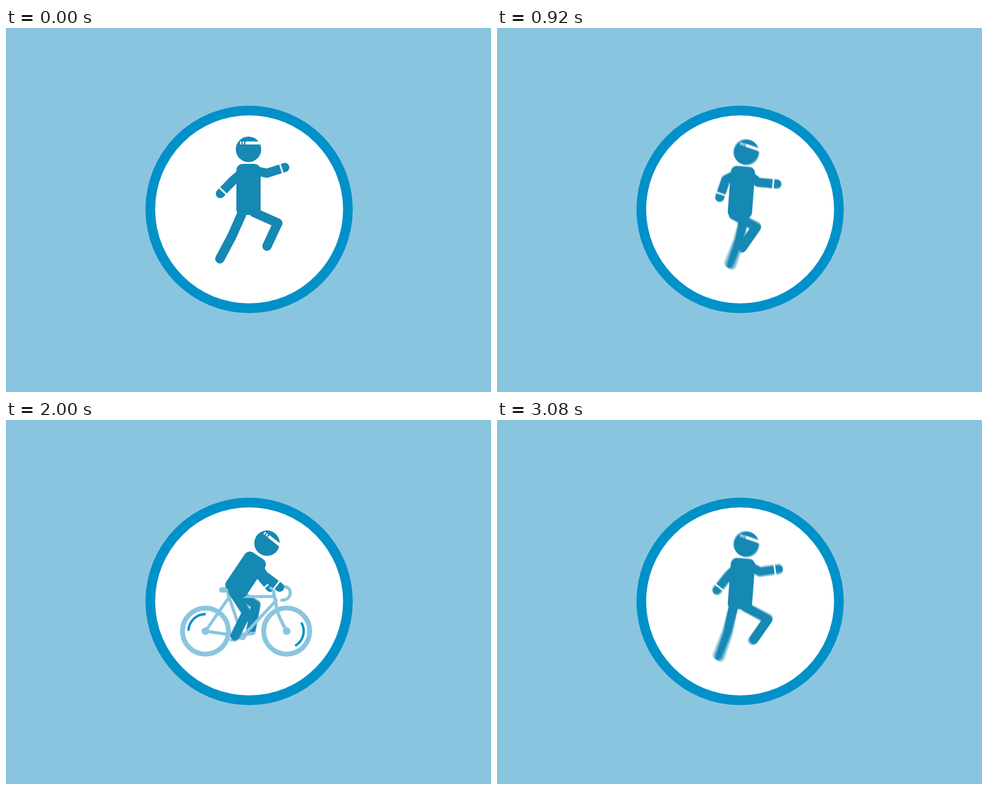
An HTML page with a canvas for the animation above (3120 ms loop, 800x600 px).

```html
<!DOCTYPE html>
<html lang="en">
<head>
<meta charset="utf-8">
<title>Run and ride</title>
<style>
  html, body { margin: 0; width: 100%; height: 100%; overflow: hidden; background: #8ac5e0; }
  canvas { display: block; }
</style>
</head>
<body>
<canvas id="stage" width="800" height="600"></canvas>
<script>
const LOOP = 3120, TICK = 40, SHUTTER = 20, SAMPLES = 10;
const STRIDE = 640, PEDAL = 480;
const SKY = '#8ac5e0', RING = '#0091c9', BODY = '#1688b4', WHITE = '#fff';
const TAU = Math.PI * 2, RAD = Math.PI / 180;

const stage = document.getElementById('stage').getContext('2d');
const buffer = document.createElement('canvas');
buffer.width = 800;
buffer.height = 600;
const g = buffer.getContext('2d');

const clamp = x => Math.min(1, Math.max(0, x));
const smooth = x => (1 - Math.cos(Math.PI * clamp(x))) / 2;
const mod = (x, n) => ((x % n) + n) % n;
const mix = (a, b, k) => Array.isArray(a) ? a.map((v, i) => mix(v, b[i], k)) : a + (b - a) * k;

// Point at a distance from p; 0 degrees is down, positive turns to the right.
const reach = (p, deg, len) => [p[0] + len * Math.sin(deg * RAD), p[1] + len * Math.cos(deg * RAD)];

// Periodic curve through [phase, value] keys, without overshoot.
function cycle(keys) {
  const n = keys.length;
  const key = i => [keys[mod(i, n)][0] + Math.floor(i / n), keys[mod(i, n)][1]];
  const slope = i => (key(i + 1)[1] - key(i)[1]) / (key(i + 1)[0] - key(i)[0]);
  const tangent = i => {
    const a = slope(i - 1), b = slope(i);
    return a * b > 0 ? 2 * a * b / (a + b) : 0;
  };
  return phase => {
    const v = mod(phase, 1);
    let i = n - 1;
    while (key(i)[0] > v) i--;
    const [x, y] = key(i), [x2, y2] = key(i + 1), w = x2 - x, k = (v - x) / w;
    return y * (1 + 2 * k) * (1 - k) ** 2 + y2 * k * k * (3 - 2 * k)
      + w * (tangent(i) * k * (1 - k) ** 2 - tangent(i + 1) * k * k * (1 - k));
  };
}

const thigh = cycle([[0, -24], [.0625, -12], [.12, -6], [.27, 30], [.4375, 62], [.5, 66], [.5625, 66], [.72, 26], [.82, 5], [.9375, -13]]);
const shin = cycle([[0, -28], [.0625, -45], [.13, -68], [.27, -62], [.4375, -35], [.5, -25], [.5625, -10], [.7, 12], [.82, -3], [.9375, -20]]);
const frontUpper = cycle([[0, 78], [.4375, 51], [.5625, 53], [.9375, 62]]);
const frontLower = cycle([[0, 108], [.4375, 85], [.5625, 90], [.9375, 98]]);
const backUpper = cycle([[0, -50], [.4375, -63], [.5625, -67], [.9375, -46]]);
const backLower = cycle([[0, -44], [.4375, -19], [.5625, -16], [.9375, -38]]);
const leanCurve = cycle([[0, 0], [.125, .3], [.65, 5.2], [.875, 4.5]]);
const nodCurve = cycle([[0, 0], [.125, 3], [.65, 16], [.875, 15]]);

function limb(start, a, lenA, b, lenB) {
  const joint = reach(start, a, lenA);
  return [start, joint, reach(joint, b, lenB)];
}

function runner(t) {
  const v = t / STRIDE, step = 2 * v;
  const bob = 15 * Math.abs(Math.sin(Math.PI * step)) ** 1.4;
  const lean = leanCurve(step), nod = nodCurve(step);
  const hip = [400, 308 + bob];
  const neck = reach(hip, 180 - lean, 84);
  const chest = reach(neck, -lean, 10);
  const leg = (x, phase) => limb([x, 304 + bob], thigh(phase), 43, shin(phase), 42);
  return {
    hip, neck, tilt: lean + nod,
    head: reach(neck, 180 - lean - nod / 2, 24),
    farArm: limb([chest[0] - 5, chest[1]], backUpper(v), 26, backLower(v), 31),
    nearArm: limb([chest[0] + 5, chest[1]], frontUpper(v), 26, frontLower(v), 31),
    farLeg: leg(409, v + .5),
    nearLeg: leg(390, v)
  };
}

const crankAngle = t => (40 + 360 * (t - 1600) / PEDAL) * RAD;

function pedalLeg(hip, angle) {
  const foot = [391 + 14 * Math.cos(angle), 351 + 14 * Math.sin(angle)];
  const dx = foot[0] - hip[0], dy = foot[1] - hip[1], d = Math.hypot(dx, dy);
  const bend = Math.sqrt(Math.max(0, 42.5 ** 2 - d * d / 4)) / d;
  return [hip, [hip[0] + dx / 2 + dy * bend, hip[1] + dy / 2 - dx * bend], foot];
}

function rider(t) {
  const c = crankAngle(t), sway = Math.sin(c);
  return {
    hip: [375, 285], neck: [416, 224], tilt: 38, head: [430.5, 203],
    farArm: [[407, 237], [417, 253], [436, 276]],
    nearArm: [[414, 236], [424, 255], [451 - sway, 276 + sway]],
    farLeg: pedalLeg([376, 282], c),
    nearLeg: pedalLeg([374, 282], c + Math.PI)
  };
}

function poseAt(t) {
  const ride = smooth((t - 1180) / 200) * (1 - smooth((t - 2760) / 140));
  const a = runner(t < 2000 ? t : t - LOOP), b = rider(t), pose = {};
  for (const part in a) pose[part] = mix(a[part], b[part], ride);
  return pose;
}

const spinAt = t => TAU * (smooth((t - 1140) / 420) + smooth((t - 2383) / 560));

function disc(x, y, r, color) {
  g.fillStyle = color;
  g.beginPath();
  g.arc(x, y, r, 0, TAU);
  g.fill();
}

function line(points, width, color, cap = 'round') {
  g.strokeStyle = color;
  g.lineWidth = width;
  g.lineCap = cap;
  g.lineJoin = 'round';
  g.beginPath();
  points.forEach(p => g.lineTo(p[0], p[1]));
  g.stroke();
}

function strokePath(d, width) {
  g.strokeStyle = SKY;
  g.lineWidth = width;
  g.lineCap = 'round';
  g.stroke(new Path2D(d));
}

function turned(x, y, angle, draw) {
  g.save();
  g.translate(x, y);
  g.rotate(angle);
  draw();
  g.restore();
}

function drawArm(points) {
  line(points, 15, BODY);
  const [, elbow, hand] = points;
  const angle = Math.atan2(hand[1] - elbow[1], hand[0] - elbow[0]);
  turned(hand[0], hand[1], angle, () => {
    g.fillStyle = WHITE;
    g.fillRect(-7.5, -9, 2.8, 18);
  });
}

function drawTorso({ hip, neck }) {
  const dx = neck[0] - hip[0], dy = neck[1] - hip[1];
  turned(neck[0], neck[1], Math.atan2(dx, -dy), () => {
    g.fillStyle = BODY;
    g.beginPath();
    g.roundRect(-20, 0, 40, Math.hypot(dx, dy), [10, 10, 8, 8]);
    g.fill();
  });
}

function drawHead({ head, tilt }) {
  turned(head[0], head[1], tilt * RAD, () => {
    disc(0, 0, 21, BODY);
    g.fillStyle = WHITE;
    g.fillRect(-14, -13, 2.2, 5);
    g.fillRect(-9.6, -13, 2.2, 5);
    g.fillRect(-5, -13, 27, 5);
  });
}

function drawWheel(x, y, arcMiddle) {
  g.lineCap = 'butt';
  g.lineWidth = 8;
  g.strokeStyle = SKY;
  g.beginPath();
  g.arc(x, y, 38, 0, TAU);
  g.stroke();
  g.lineWidth = 4;
  g.strokeStyle = RING;
  g.beginPath();
  g.arc(x, y, 28, arcMiddle - Math.PI / 4, arcMiddle + Math.PI / 4);
  g.stroke();
  disc(x, y, 6.3, SKY);
}

function drawBike(t) {
  const roll = TAU * (t - 1600) / PEDAL;
  drawWheel(329, 348, roll - 74 * RAD);
  drawWheel(463, 348, roll + 75 * RAD);
  strokePath('M368 292 L329 348 L390 357 L366 286 M367 291 H443 M390 357 L446 297', 5);
  strokePath('M437 277 H440 L447 313 Q449 323 463 348', 5.5);
  strokePath('M455 275 C473 271 474 297 455 297', 5);
  strokePath('M356 280 H366', 9);
  disc(390, 357, 6, SKY);
  for (const side of [0, Math.PI]) {
    const a = crankAngle(t) + side;
    const x = 390 + 17 * Math.cos(a), y = 357 + 17 * Math.sin(a);
    line([[390, 357], [x, y]], 4, SKY);
    line([[x - 5, y], [x + 5, y]], 4, SKY, 'butt');
  }
}

const around = (angle, draw) => turned(400, 300, angle, () => {
  g.translate(-400, -300);
  draw();
});

function drawScene(bikeTime, bodyTime) {
  g.fillStyle = SKY;
  g.fillRect(0, 0, 800, 600);
  disc(401, 299, 171, RING);
  disc(401, 299, 155, WHITE);
  const pose = poseAt(bodyTime), spin = spinAt(bodyTime);
  around(spin, () => {
    line(pose.farLeg, 15.5, BODY);
    drawArm(pose.farArm);
  });
  if (bikeTime >= 1400 && bikeTime < 2800) around(spinAt(bikeTime), () => drawBike(bikeTime));
  around(spin, () => {
    drawTorso(pose);
    line(pose.nearLeg, 15.5, BODY);
    drawArm(pose.nearArm);
    drawHead(pose);
  });
}

// Averages several moments of the figure for motion blur.
function render(t) {
  const count = t === 0 ? 1 : SAMPLES;
  for (let i = 0; i < count; i++) {
    drawScene(t, t + (count > 1 ? SHUTTER * (i / (count - 1) - .5) : 0));
    stage.globalAlpha = 1 / (i + 1);
    stage.drawImage(buffer, 0, 0);
  }
}

const start = performance.now();
let shown = -1;
function frame() {
  const t = Math.floor(mod(performance.now() - start, LOOP) / TICK) * TICK;
  if (t !== shown) render(shown = t);
  requestAnimationFrame(frame);
}
frame();
</script>
</body>
</html>
```
